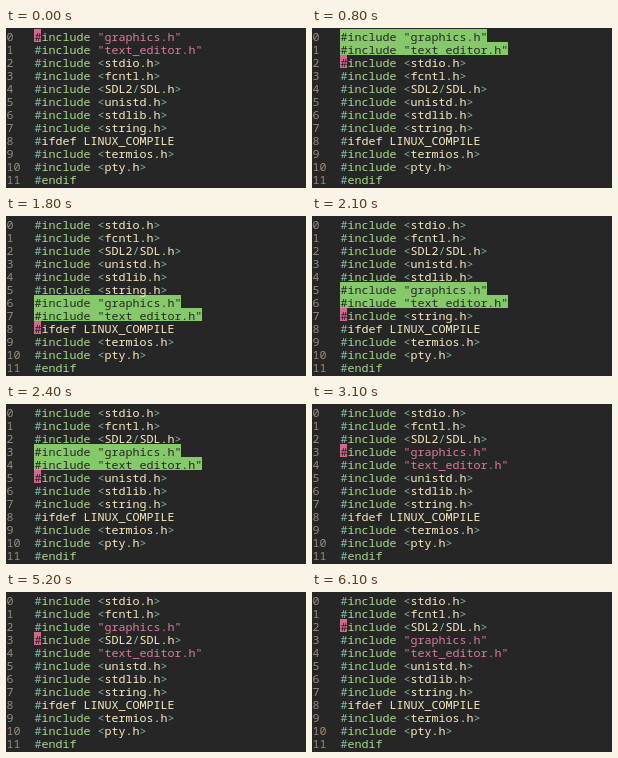
These frames come from a looping animation (300 px wide and 160 px high, 6.3 s). An HTML page:

```html
<!DOCTYPE html>
<html lang="en">
<head>
<meta charset="utf-8">
<style>
  html, body { margin: 0; width: 100%; height: 100%; overflow: hidden; background: #262626; }
  svg { display: block; width: 300px; height: 160px; }
  text { font: 500 11.667px "Noto Sans Mono", monospace; white-space: pre; fill: #f8ebc2; }
  .num { fill: #98897c; }
  .mark { fill: #83b9a6; }
  .key { fill: #a9d98c; }
  .str { fill: #d87b9b; }
  .dark { fill: #262626; }
  .sel { fill: #86c96a; }
  .cursor { fill: #cf6a8e; }
</style>
</head>
<body>
<svg id="stage" viewBox="0 0 300 160"></svg>
<script>
const LOOP = 6300, ROW = 13, CHAR = 7, LEFT = 28;
const stage = document.getElementById('stage');

const include = name => '#include ' + name;
const source = [
  ...['graphics', 'text_editor'].map(s => include(`"${s}.h"`)),
  ...['stdio', 'fcntl', 'SDL2/SDL', 'unistd', 'stdlib', 'string'].map(s => include(`<${s}.h>`)),
  '#ifdef LINUX_COMPILE',
  ...['termios', 'pty'].map(s => include(`<${s}.h>`)),
  '#endif'
];

// Editor commands; the selection is the `count` rows above the cursor.
function select(ed) { ed.cursor++; ed.count++; }
function cursorUp(ed) { ed.cursor--; ed.count = 0; }
function move(ed, dir) {
  const size = ed.count || 1, start = ed.cursor - ed.count;
  const lines = ed.lines.splice(start, size);
  ed.lines.splice(start + dir, 0, ...lines);
  ed.cursor += dir;
}
const moveDown = ed => move(ed, 1);
const moveUp = ed => move(ed, -1);

// Each command with the times of its key presses; held keys repeat twice per screen update.
const presses = [
  [select, 200, 400],
  [moveDown, 1000, 1500, 1700, 1700, 1800, 1800],
  [moveUp, 2000, 2300, 2400],
  [cursorUp, 2900, 3100, 3300],
  [moveDown, 3900, 4800],
  [moveUp, 5200, 5400]
].flatMap(([run, ...times]) => times.map(at => ({ run, at })));

const escape = s => s.replace(/</g, '&lt;').replace(/>/g, '&gt;');
const span = (cls, s) => `<tspan class="${cls}">${escape(s)}</tspan>`;
const block = (cls, row, chars) =>
  `<rect class="${cls}" x="${LEFT}" y="${row * ROW + 1}" width="${chars * CHAR}" height="${ROW}"/>`;
const text = (x, row, body) => `<text x="${x + 0.5}" y="${row * ROW + 13}">${body}</text>`;

const highlight = line => line.replace(/"[^"]*"|[#<>/]|include|endif|[^"#<>/]/g, s =>
  s[0] === '"' ? span('str', s)
    : /[#<>/]/.test(s) ? span('mark', s)
    : s.length > 1 ? span('key', s) : s);

function draw(count) {
  const ed = { lines: [...source], cursor: 0, count: 0 };
  presses.slice(0, count).forEach(p => p.run(ed));
  let back = '', front = '';
  ed.lines.forEach((line, row) => {
    const selected = row < ed.cursor && row >= ed.cursor - ed.count;
    const dark = selected ? line.length : row === ed.cursor ? 1 : 0;
    if (dark) back += block(selected ? 'sel' : 'cursor', row, dark);
    front += text(0, row, span('num', String(row)))
      + text(LEFT, row, span('dark', line.slice(0, dark)) + highlight(line.slice(dark)));
  });
  stage.innerHTML = back + front;
}

let shown;
function tick() {
  const t = performance.now() % LOOP;
  const count = presses.filter(p => p.at <= t).length;
  if (count !== shown) draw(shown = count);
  requestAnimationFrame(tick);
}
tick();
</script>
</body>
</html>
```
